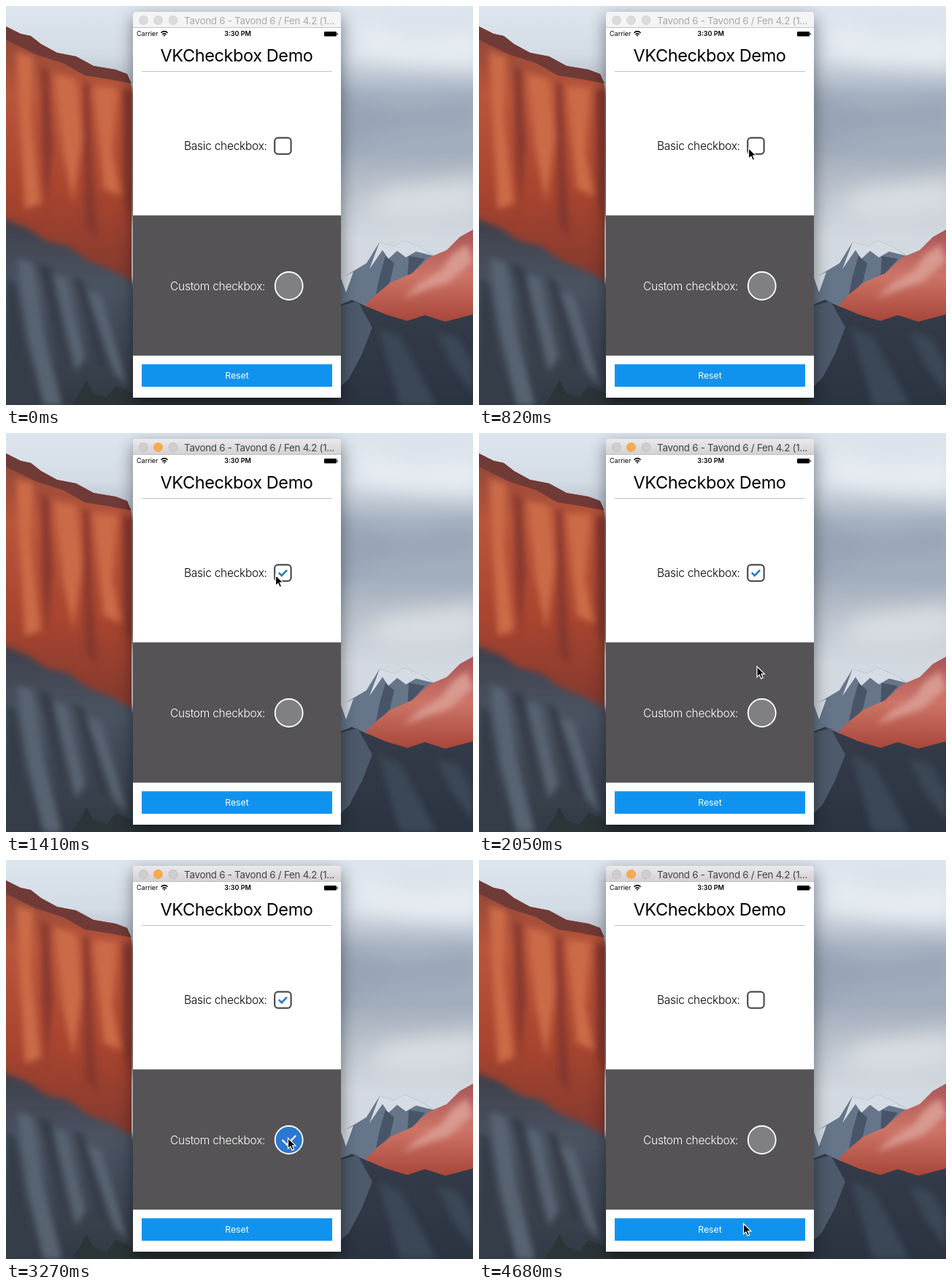
Animation of 640 by 546 pixels, one loop 4.72 s. Source, as an HTML page:

```html
<!DOCTYPE html>
<html lang="en">
<head>
<meta charset="utf-8">
<title>Checkbox demo</title>
<style>
  html, body { margin: 0; width: 100%; height: 100%; overflow: hidden; }
  svg { display: block; width: 640px; height: 546px; }
  text { font-family: Inter, Roboto, sans-serif; }
  .label { font-size: 15.5px; font-weight: 300; letter-spacing: -.26px; }
  .tick { fill: none; stroke-dasharray: 1 2; }
  #win { filter: drop-shadow(0 8px 11px rgba(0, 0, 0, .45)); }
</style>
</head>
<body>
<svg viewBox="0 0 640 546">
  <defs>
    <linearGradient id="sky" x2="0" y2="1">
      <stop stop-color="#dde5ee"/><stop offset=".12" stop-color="#d3dbe4"/>
      <stop offset=".22" stop-color="#a9b4c3"/><stop offset=".36" stop-color="#a2adbc"/>
      <stop offset=".47" stop-color="#bcc4ce"/><stop offset=".58" stop-color="#d3d9e0"/>
    </linearGradient>
    <linearGradient id="cliff" x2="0" y2="1">
      <stop stop-color="#8d4639"/><stop offset=".25" stop-color="#b9553a"/>
      <stop offset=".6" stop-color="#a9452f"/><stop offset="1" stop-color="#7c372f"/>
    </linearGradient>
    <linearGradient id="shade" x2="0" y2="1">
      <stop stop-color="#3d3d49"/><stop offset=".35" stop-color="#4a5462"/>
      <stop offset="1" stop-color="#2d3640"/>
    </linearGradient>
    <linearGradient id="ridge" x2="0" y2="1">
      <stop stop-color="#a8565a"/><stop offset=".5" stop-color="#cd7467"/>
      <stop offset="1" stop-color="#a8463a"/>
    </linearGradient>
    <linearGradient id="forest" x2="0" y2="1">
      <stop stop-color="#363c49"/><stop offset="1" stop-color="#2a3441"/>
    </linearGradient>
    <linearGradient id="activeBar" x2="0" y2="1">
      <stop stop-color="#ebe9eb"/><stop offset="1" stop-color="#d2d0d2"/>
    </linearGradient>
    <filter id="cloudy" x="-30%" y="-60%" width="160%" height="220%"><feGaussianBlur stdDeviation="14"/></filter>
    <filter id="soft" x="-10%" y="-10%" width="120%" height="120%"><feGaussianBlur stdDeviation="4"/></filter>
  </defs>

  <!-- sky -->
  <path fill="url(#sky)" d="M0 0H640V546H0Z"/>
  <g filter="url(#cloudy)">
    <path fill="#e6ecf2" d="M480 20L560 40 650 30V85L560 80 480 70Z"/>
    <path fill="#98a4b5" d="M455 120L550 140 650 125V165L540 172 455 195Z"/>
    <path fill="#d9dde2" d="M520 250L650 235V285L560 295 490 285Z"/>
  </g>

  <!-- left cliff -->
  <path fill="url(#cliff)" d="M0 28L20 38 34 41 48 52 70 64 96 69 120 82 150 87 166 93 172 110V400H0Z"/>
  <path fill="#703a37" d="M0 28L20 38 34 41 48 52 70 64 96 69 120 82 150 87 166 93 172 106 140 100 108 95 78 78 40 66 0 46Z"/>
  <g filter="url(#soft)">
    <path fill="#cb6a46" d="M14 62L38 70 34 150 48 270 26 278 20 180ZM66 92L96 100 104 180 92 270 78 200ZM120 110L152 112 146 200 158 260 134 250Z"/>
    <path fill="#86392f" d="M48 82L58 88 64 190 56 282 50 190ZM106 104L114 106 118 220 126 320 108 300ZM160 112L174 116V300L162 270Z"/>
    <path fill="url(#shade)" d="M-20 284L30 304 56 322 84 328 112 348 142 360 190 386V566H-20Z"/>
    <path fill="#596472" d="M16 345L36 352 52 450 76 546H52L30 450ZM66 366L82 374 108 480 96 500ZM112 390L130 396 166 520 148 500Z"/>
    <path fill="#363e4a" d="M0 370L14 380 28 480 40 546H0ZM44 352L62 358 88 500 70 470ZM92 370L106 376 142 500 124 490Z"/>
  </g>
  <path fill="#2b3437" d="M90 546L102 528 110 512 120 530 138 536 150 520 174 530H470V546Z"/>

  <!-- right mountains -->
  <path fill="#66758a" d="M450 378L474 364 494 352 512 323 532 329 546 321 568 330 588 343V420H450Z"/>
  <path fill="#d5dce3" d="M512 323L532 329 546 321 568 330 586 342 562 336 548 344 536 335 524 346 516 334 498 360ZM459 372L476 364 466 392Z"/>
  <path fill="#485569" d="M520 342L532 352 526 378 506 400 512 370ZM552 342L574 346 550 374Z"/>
  <path fill="url(#forest)" d="M450 412L474 402 496 412 640 420V546H450Z"/>
  <path fill="#4d5a6c" d="M459 410L482 404 502 440 488 476 470 510 459 520Z"/>
  <path fill="url(#ridge)" d="M640 306L622 316 604 334 580 344 556 366 528 378 508 394 492 410 520 422 550 431 574 423 602 432 640 422Z"/>
  <path fill="#d8998f" filter="url(#soft)" d="M632 326L612 340 596 362 566 380 544 400 580 386 606 378 640 350Z"/>
  <path fill="#3b4655" filter="url(#soft)" d="M510 440L540 452 566 500 590 546H540L524 490ZM590 446L620 454 640 490V530L610 490Z"/>

  <!-- simulator window -->
  <g id="win">
    <path fill="#fff" d="M174 536V13Q174 8 179 8H454Q459 8 459 13V536Z"/>
  </g>
  <path id="bar" d="M174 30V13Q174 8 179 8H454Q459 8 459 13V30Z"/>
  <path stroke="#c4c2c4" d="M174 29.5H459"/>
  <g stroke-width=".7">
    <circle class="light" cx="188.5" cy="19.5" r="6"/>
    <circle id="amber" class="light" cx="208.5" cy="19.5" r="6"/>
    <circle class="light" cx="229" cy="19.5" r="6"/>
  </g>
  <text id="caption" x="244" y="24.5" font-size="13.3" letter-spacing="-.23">Tavond 6 - Tavond 6 / Fen 4.2 (1...</text>

  <text x="179" y="41.3" font-size="9">Carrier</text>
  <path fill="none" stroke="#000" stroke-width="1.5" d="M212.4 36.7Q217 32.6 221.6 36.7M214.3 39Q217 36.6 219.7 39"/>
  <path d="M215.5 40.2Q217 39 218.5 40.2L217 41.8Z"/>
  <text x="317.5" y="41.3" font-size="9" font-weight="600" text-anchor="middle">3:30 PM</text>
  <rect x="436" y="35" width="17" height="6.5" rx="1.3"/>
  <rect x="453.6" y="37" width="1.2" height="2.5" rx=".5"/>

  <text x="316" y="76.3" font-size="23.5" letter-spacing="-.4" text-anchor="middle">VKCheckbox Demo</text>
  <path stroke="#c3c2c4" d="M186 89.5H447"/>

  <text class="label" x="244" y="197">Basic checkbox:</text>
  <rect x="368.2" y="180.4" width="22.4" height="22.2" rx="4.5" fill="#fff" stroke="#4d4c50" stroke-width="2.2"/>
  <path id="basicTick" class="tick" pathLength="1" stroke="#2879cb" stroke-width="2.6" d="M373.8 191.2L377.8 195.2 385 187.6"/>

  <path fill="#555355" d="M174 286.6H459V478.4H174Z"/>
  <text class="label" x="225" y="388.5" fill="#fff">Custom checkbox:</text>
  <circle cx="387.7" cy="383" r="19" fill="#807f81"/>
  <circle id="customFill" cx="387.7" cy="383" r="19" fill="#2a78d2"/>
  <circle cx="387.7" cy="383" r="19" fill="none" stroke="#fff" stroke-width="1.8"/>
  <path id="customTick" class="tick" pathLength="1" stroke="#fff" stroke-width="2.2" d="M378.5 383L385.2 389.7 397.2 377"/>

  <path fill="#1093ee" d="M186 490.3H447V521H186Z"/>
  <text id="reset" x="316.5" y="510.3" font-size="12.3" fill="#fff" text-anchor="middle">Reset</text>

  <!-- pointer -->
  <g id="pointer">
    <g id="ring" fill="none">
      <circle cy="1.5" r="22.5" stroke="#fff" stroke-opacity=".6" stroke-width="3"/>
      <circle cy="1.5" r="22.5" stroke="#000" stroke-width="1.6"/>
    </g>
    <path stroke="#fff" stroke-width="1.2" d="M0 0V14.5L3.4 11.4 5.6 16.6 8.2 15.5 6 10.4H10.4Z"/>
  </g>
</svg>

<script>
const LOOP = 4720;
const ACTIVATE = 1050, CHECK_BASIC = 1080, CHECK_CUSTOM = 2580, RESET = 4090;
const presses = [[950, 1080], [2450, 2580], [3930, RESET]];
const stops = [
  [200, 520, 560], [750, 369.5, 194.5], [1650, 369.5, 194.5],
  [2300, 386.5, 380.5], [3350, 386.5, 380.5], [3850, 362.5, 497.5], [LOOP, 362.5, 497.5]
];

const $ = id => document.getElementById(id);
const set = (el, attrs) => { for (const k in attrs) el.setAttribute(k, attrs[k]); };
const clamp = v => Math.max(0, Math.min(1, v));
const ramp = (t, start, length) => clamp((t - start) / length);
const ease = p => p * p * (3 - 2 * p);
const lights = document.querySelectorAll('.light');

function pointerAt(t) {
  const i = Math.max(1, stops.findIndex(s => s[0] > t));
  const [t0, x0, y0] = stops[i - 1], [t1, x1, y1] = stops[i];
  const p = ease(ramp(t, t0, t1 - t0));
  return [x0 + (x1 - x0) * p, y0 + (y1 - y0) * p];
}

function drawTick(id, p) {
  set($(id), { 'stroke-dashoffset': 1 - p, visibility: p > 0 ? 'visible' : 'hidden' });
}

function render(t) {
  const active = t >= ACTIVATE;
  set($('bar'), { fill: active ? 'url(#activeBar)' : '#f5f4f5' });
  set($('caption'), { fill: active ? '#444245' : '#aaa8aa' });
  lights.forEach(l => set(l, { fill: active ? '#cfcdcf' : '#dcdadc', stroke: active ? '#b9b7b9' : '#cfcdcf' }));
  if (active) set($('amber'), { fill: '#fbab4d', stroke: '#e4953d' });

  const checked = start => clamp(ramp(t, start, 300) - ramp(t, RESET, 300));
  const custom = checked(CHECK_CUSTOM);
  drawTick('basicTick', checked(CHECK_BASIC));
  drawTick('customTick', custom);
  set($('customFill'), { opacity: clamp(custom * 2) });

  const pressed = presses.map(([from, to]) => t >= from && t < to);
  set($('ring'), { visibility: pressed.includes(true) ? 'visible' : 'hidden' });
  set($('reset'), { opacity: pressed[2] ? .22 : t < RESET ? 1 : .22 + .78 * ramp(t, RESET, 250) });
  set($('pointer'), { transform: `translate(${pointerAt(t)})` });
}

function tick() {
  render(performance.now() % LOOP);
  requestAnimationFrame(tick);
}
tick();
</script>
</body>
</html>
```
